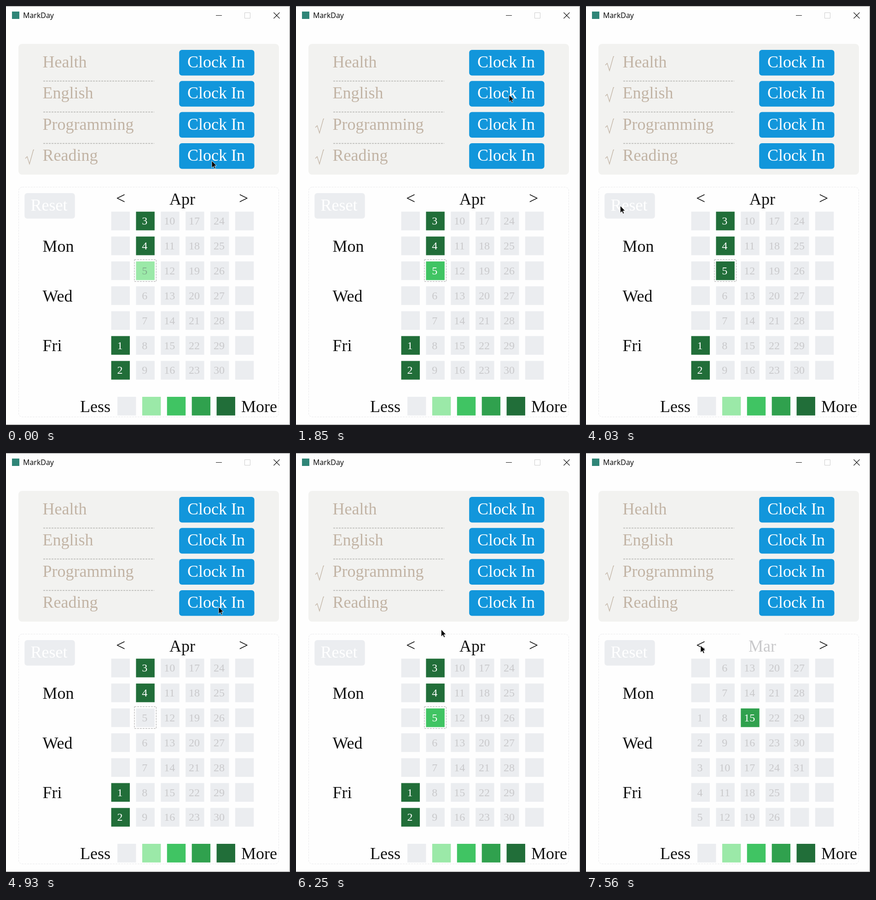
An HTML page for the animation above (8 s loop, 617 by 907 pixels).

```html
<!DOCTYPE html>
<html lang="en">
<head>
<meta charset="utf-8">
<title>MarkDay</title>
<style>
  html, body { margin: 0; width: 100%; height: 100%; overflow: hidden; background: #fefefe; }
  svg { display: block; width: 617px; height: 907px; font: 36px "Liberation Serif", serif; }
  text { white-space: pre; }
  .title { font: 16px "Open Sans", sans-serif; }
  .day { font-size: 24px; text-anchor: middle; }
  .mid { text-anchor: middle; }
</style>
</head>
<body>
<svg id="stage" viewBox="0 0 617 907"></svg>
<script>
const LOOP = 8000;
const LEVELS = ['#ebedf0', '#9be9a8', '#40c463', '#30a14e', '#216e39'];
const TAN = '#c2b4a5', PALE = '#c9c9cb', INK = '#111', PAPER = '#fefefe';
const ROW = 67.3, PITCH = 53.86, CELL = 40.4;
const stage = document.getElementById('stage');

function add(tag, attrs, content = '') {
  const node = document.createElementNS('http://www.w3.org/2000/svg', tag);
  for (const key in attrs) node.setAttribute(key, attrs[key]);
  node.textContent = content;
  return stage.appendChild(node);
}
const rect = (x, y, width, height, fill, more) => add('rect', { x, y, width, height, fill, ...more });
const label = (x, y, content, fill = INK, cls = '') => add('text', { x, y, fill, class: cls }, content);
const line = (d, stroke, more) => add('path', { d, stroke, fill: 'none', ...more });
const show = (node, visible) => node.setAttribute('visibility', visible ? 'visible' : 'hidden');

// Window frame and title bar
line('M0 .5H616.5V906.5H0', '#858585');
rect(13, 12, 16, 16, '#2f8577');
label(37, 26, 'MarkDay', '#000', 'title');
line('M456 20.5H469', '#222');
line('M518.5 14.5h12v12h-12Z', '#cfcfcf');
line('M581.5 14l13 13m0 -13l-13 13', '#222', { 'stroke-width': 1.2 });

// Task list
rect(27, 82, 566, 283, '#f2f2f0', { rx: 8 });
const ticks = ['Health', 'English', 'Programming', 'Reading'].map((task, i) => {
  const top = 95 + ROW * i, base = Math.round(top + 38);
  label(79.5, base, task, TAN);
  rect(376.2, top, 163.4, 55.5, '#1296db', { rx: 6 });
  label(394, base, 'Clock In', '#fff');
  if (i < 3) line(`M81 ${base + 29.5}h241`, '#b3b3b0', { 'stroke-width': 1.3, 'stroke-dasharray': '4 2' });
  return line(`M42 ${base - 5}l4 -4 5 16 8.5 -30.5h1.5`, TAN, { 'stroke-width': 1.3 });
});

// Calendar panel
rect(27.5, 392, 565, 497.5, 'none', { rx: 8, stroke: '#e9e9eb', 'stroke-dasharray': '4 2' });
const headerGap = rect(336, 391, 95, 3, PAPER);
rect(40.3, 405, 109.4, 55.3, LEVELS[0], { rx: 6 });
label(53.5, 443, 'Reset', '#fff');
label(239, 428, '<');
label(506, 428, '>');
const monthName = label(383, 430, '', INK, 'mid');
['Mon', 'Wed', 'Fri'].forEach((name, i) => label(79.5, Math.round(532 + 2 * PITCH * i), name));
label(161, 879, 'Less');
label(511, 879, 'More');
LEVELS.forEach((color, i) => rect(242.1 + PITCH * i, 846, CELL, CELL, color));

const cells = Array.from({ length: 42 }, (_, i) => {
  const x = 228.6 + PITCH * Math.floor(i / 7), y = 445.2 + PITCH * (i % 7);
  return { box: rect(x, y, CELL, CELL, LEVELS[0]), text: label(x + 18.9, Math.round(y + 28), '', '#fff', 'day') };
});
const today = rect(279, 549, 47.3, 47.3, 'none', { stroke: '#a5a5a5', 'stroke-dasharray': '4 2' });
const cursor = add('path', {
  d: 'M0 0V15.5L3.5 12 6 17.3 8.3 16.3 6 11H10.5Z',
  fill: '#000', stroke: '#fff', 'stroke-width': .8
});

// Pointer moves, each easing from the previous rest point to x, y
const HOME = { x: 447, y: 335 };
const MOVES = [
  { from: 430, to: 790, x: 462, y: 260 },
  { from: 1190, to: 1850, x: 463, y: 192 },
  { from: 2440, to: 2860, x: 465.5, y: 119 },
  { from: 3640, to: 4030, x: 74.5, y: 432.5 },
  { from: 4570, to: 4930, x: 462, y: 333 },
  { from: 5350, to: 5870, x: 463, y: 257 },
  { from: 6130, to: 6250, x: 315.5, y: 382 },
  { from: 6370, to: 6610, x: 231, y: 424 },
  { from: 6730, to: 7130, x: 249, y: 416.5 }
];
const SAMPLE = 130;
const CLICKS = [910, 2160, 3240, 5200, 5990];
const RESET = 4150, REPAINT_END = 3390, MONTH_CHANGE = 7560;

const smooth = u => u * u * (3 - 2 * u);

// The pointer is seen only at samples about 130 ms apart, spread evenly over each move.
function pointerAt(t) {
  let { x, y } = HOME;
  for (const move of MOVES) {
    if (t < move.from) break;
    const gaps = Math.round((move.to - move.from) / SAMPLE);
    const sample = Math.floor((t - move.from) / (move.to - move.from) * gaps + 1e-6);
    const k = smooth(Math.min(1, (sample + 1) / (gaps + 1)));
    x += (move.x - x) * k;
    y += (move.y - y) * k;
  }
  return { x, y };
}

function tasksDone(t) {
  const since = t < RESET ? 0 : RESET;
  return (since ? 0 : 1) + CLICKS.filter(click => click >= since && click <= t).length;
}

function drawMonth(name, offset, days, levelOf, hiddenDay) {
  monthName.textContent = name;
  cells.forEach(({ box, text }, i) => {
    const day = i - offset + 1;
    const valid = day > 0 && day <= days;
    const level = valid ? levelOf(day) : 0;
    box.setAttribute('fill', LEVELS[level]);
    text.setAttribute('fill', level > 1 ? '#fff' : level ? '#7fad8b' : PALE);
    text.textContent = valid && day !== hiddenDay ? day : '';
  });
}

function render(t) {
  const done = tasksDone(t);
  const { x, y } = pointerAt(t);
  const april = t < MONTH_CHANGE;
  const repainting = done === 4 && t < REPAINT_END;
  const todayLevel = repainting ? 3 : done;

  cursor.setAttribute('transform', `translate(${x} ${y})`);
  ticks.forEach((tick, i) => show(tick, i >= 4 - done));
  show(today, april);
  show(headerGap, !april);
  monthName.setAttribute('fill', april ? INK : PALE);
  if (april) drawMonth('Apr', 5, 30, day => day < 5 ? 4 : day === 5 ? todayLevel : 0, repainting ? 1 : 0);
  else drawMonth('Mar', 2, 31, day => day === 15 ? 3 : 0, 0);
}

const start = performance.now();
function frame() {
  render((performance.now() - start) % LOOP);
  requestAnimationFrame(frame);
}
frame();
</script>
</body>
</html>
```
